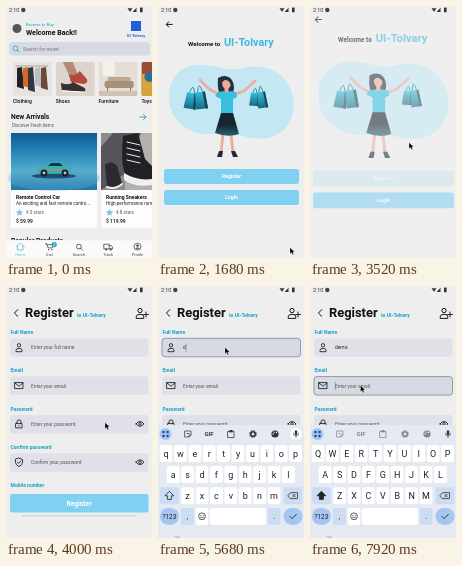
Recreate the animation shown at these times as an HTML page. Size 146 by 252 pixels, loop 8000 ms.

```html
<!DOCTYPE html>
<html lang="en">
<head>
<meta charset="utf-8">
<title>Shop app</title>
<style>
html, body { margin: 0; width: 100%; height: 100%; overflow: hidden; background: #eee; }
svg { display: block; width: 100%; height: 100%; }
text { font-family: Roboto, sans-serif; white-space: pre; }
</style>
</head>
<body>
<svg id="stage" viewBox="0 0 146 252"></svg>
<script>
const LOOP = 8000;
const BG = '#eeeeee', INK = '#111', CYAN = '#1b9fca', SKY = '#80d1f1', FIELD = '#dfe0e8';
const BRAND = 'UI-Tolvary';

// Markup helpers
const text = (x, y, size, str, fill = INK, weight = 400, anchor = 'start', extra = '') =>
  `<text x="${x}" y="${y}" font-size="${size}" fill="${fill}" font-weight="${weight}" text-anchor="${anchor}" ${extra}>${str}</text>`;
const rect = (x, y, w, h, fill, r = 0, extra = '') =>
  `<rect x="${x}" y="${y}" width="${w}" height="${h}" rx="${r}" fill="${fill}" ${extra}/>`;
const circle = (x, y, r, fill, extra = '') => `<circle cx="${x}" cy="${y}" r="${r}" fill="${fill}" ${extra}/>`;
const ellipse = (x, y, rx, ry, fill) => `<ellipse cx="${x}" cy="${y}" rx="${rx}" ry="${ry}" fill="${fill}"/>`;
const shape = (d, fill) => `<path d="${d}" fill="${fill}"/>`;
const line = (d, color = INK, w = .8) =>
  `<path d="${d}" fill="none" stroke="${color}" stroke-width="${w}" stroke-linecap="round" stroke-linejoin="round"/>`;
const group = (id, body, extra = '') => `<g id="${id}" ${extra}>${body}</g>`;
const at = (x, y, body) => `<g transform="translate(${x} ${y})">${body}</g>`;
const gradient = (id, stops, dir = 'x2="0" y2="1"') => `<linearGradient id="${id}" ${dir}>` +
  stops.map((c, i) => `<stop offset="${i / (stops.length - 1)}" stop-color="${c}"/>`).join('') + '</linearGradient>';

// Icons, centred on 0,0
const ring = (r, c = INK, w = .8) => circle(0, 0, r, 'none', `stroke="${c}" stroke-width="${w}"`);
const lens = c => ring(2.4, c) + line('M1.8 1.8L3.7 3.7', c);
const person = ring(1.7).replace('cy="0"', 'cy="-2"') + line('M-3 4V3Q-3 1 0 1T3 3V4Z');
const mail = line('M-4-3H4V3H-4ZM-4-2.6L0 .6L4-2.6');
const lock = line('M-3-.5H3V4H-3ZM-2-.5V-2Q-2-4 0-4T2-2V-.5M0 1.2V2');
const shield = line('M0-4L3.6-2.7V0Q3.2 3 0 4.4Q-3.2 3-3.6 0V-2.7ZM-1.5 0L-.3 1.2L1.7-1.2');
const eye = line('M-4 0Q0-5 4 0Q0 5-4 0Z') + circle(0, 0, 1.3, 'none', `stroke="${INK}" stroke-width=".8"`);
const star = shape('M0-3.6L1.1-1.2L3.6-1L1.7 .7L2.3 3.2L0 1.9L-2.3 3.2L-1.7 .7L-3.6-1L-1.1-1.2Z', '#72c7ea');
const arrow = (c, w) => line('M-3 0H3', c, w);

function statusBar() {
  return text(3, 6.2, 5.4, '2:10', '#333') + circle(17.3, 4, 2.2, '#444') +
    shape('M121.5 2.2H126.5L124 5.8Z', '#333') + shape('M130.5 6V1.8L126.6 6Z', '#333') +
    rect(134, 1.6, 2.6, 4.6, '#333', .5);
}

function categories() {
  const clothes = rect(0, 0, 39, 34, '#e6e3e0') + line('M3 4H35', '#8c8580', .7) +
    [['#1e2226', 4, 20], ['#d8672b', 10, 19], ['#33363a', 15, 23], ['#b9bec2', 22, 18], ['#6b4a3a', 28, 21]]
      .map(([c, x, h]) => shape(`M${x} 6L${x + 5} 5L${x + 7} ${h + 7}L${x} ${h + 5}Z`, c)).join('');
  const shoes = rect(0, 0, 39, 34, '#ddd5cb') + shape('M7 0L17 0L23 15L16 19Z', '#b58b76') +
    shape('M13 12Q19 15 24 9L31 17Q33 21 28 22L15 20Z', '#b4493f') +
    shape('M5 21Q14 24 17 20L29 26Q31 30 26 30L6 28Z', '#39302f') + line('M7 29L28 30', '#fff', 1.2);
  const sofa = rect(0, 0, 39, 34, '#e5ded5') + rect(4, 0, 12, 14, '#f4f1ec') +
    rect(9, 15, 23, 9, '#bda78f', 2) + rect(6, 19, 29, 7, '#a88f77', 2) +
    line('M9 26V30M32 26V30', '#6d5744') + rect(0, 29, 39, 5, '#d0c2b2');
  const toys = rect(0, 0, 39, 34, '#9a4b32') + rect(0, 12, 39, 22, '#d9a33c') + circle(8, 15, 5, '#2c6f96');
  return [clothes, shoes, sofa, toys].map((art, i) =>
    at(7 + 42.8 * i, 56, `<g clip-path="url(#thumb)">${art}</g>` +
      text(0, 41.4, 5, ['Clothing', 'Shoes', 'Furniture', 'Toys'][i], '#111', 500))).join('');
}

function car() {
  return ellipse(0, 8, 22, 2.5, '#1c4e70') +
    shape('M-17 4L-16-1L-8-2L-4-6H7L11-2L17-1L18 5L-15 6Z', '#35b1b5') +
    shape('M-6-2L-3-5H6L9-2Z', '#16354c') + line('M-14 2H15', '#e0823c', 1.2) +
    [-10, 11].map(x => circle(x, 5, 3.4, '#162028') + circle(x, 5, 1.4, '#b9c7cd')).join('');
}

function sneakers() {
  return rect(0, 0, 51, 57, '#b3b0ae') + rect(0, 0, 24, 57, '#8c8a8a') +
    shape('M0 14L12 0H40L25 40L0 57Z', '#55555a') +
    shape('M22 3L37 0L44 26L51 33V48Q38 51 26 44Q19 35 22 3Z', '#202126') +
    shape('M23 40Q36 48 51 46V52Q35 55 23 47Z', '#f1f0ee') +
    [9, 15, 21, 27].map(y => line(`M26 ${y}L39 ${y + 3}`, '#eee', 1)).join('') +
    shape('M4 32Q10 26 16 33L21 50Q13 57 6 53Z', '#2a2b30') + line('M6 54Q14 57 21 51', '#eee', 2);
}

function product(x, art, name, note, rating, price) {
  return at(x, 127, rect(0, 0, 86, 95, '#fdfdfd', 2) + art +
    text(5, 66, 5, name, INK, 700) + text(5, 72.4, 4.6, note, '#222') +
    at(8.5, 79.5, star) + text(15, 81.3, 4.6, rating, '#555') + text(5, 90.2, 5, price, INK, 500));
}

function tabBar() {
  const icons = [
    line('M-4 0L0-3.6L4 0M-2.8-.7V3.4H2.8V-.7', '#45b5de', .7),
    line('M-4.2-3H-3L-1.6 1.3H2.8L3.8-2H-2.5', '#333', .7) + circle(-1, 3, .7, '#333') + circle(2.4, 3, .7, '#333') +
      circle(4.6, -2, 2.6, '#249fbe') + text(4.6, -.7, 3.4, '2', '#fff', 700, 'middle'),
    lens('#333'),
    line('M-4-2.4H1V2.3H-4ZM1-1H3L4.3 .6V2.3H1', '#333', .7) + circle(-2, 2.9, .9, '#333') + circle(2.6, 2.9, .9, '#333'),
    ring(3.5, '#333', .7) + circle(0, -1, 1.2, '#333') + shape('M-2.2 2.2Q0-.4 2.2 2.2Z', '#333')
  ];
  return rect(0, 234, 146, 18, '#fafafa') + line('M0 234H146', '#dedede', .4) +
    ['Home', 'Cart', 'Search', 'Track', 'Profile'].map((name, i) =>
      at(14.3 + 29.3 * i, 240.6, icons[i] + text(0, 9, 4, name, i ? '#444' : '#62bfe2', 400, 'middle'))).join('');
}

function home() {
  return rect(0, 0, 146, 252, BG) + circle(11, 22.5, 4.5, '#555') +
    text(20, 20, 4.4, 'Browse to Buy', CYAN) + text(20, 29, 7.1, 'Welcome Back!!', INK, 700) +
    rect(125, 15, 10, 10, '#2360d8') + text(130, 30.7, 4, BRAND, '#2360d8', 700, 'middle') +
    rect(3, 36, 141, 13.5, '#d8dae3', 3.5) + at(9.5, 42.4, lens('#239fc9')) +
    text(17, 44.6, 4.9, 'Search for more!', '#777') + categories() +
    text(5, 113.2, 6.7, 'New Arrivals', INK, 700) + text(6, 120.5, 4.5, 'Discover Fresh Items', '#555') +
    at(137, 111, arrow('#229fcd', .9) + line('M.5-2.5L3 0L.5 2.5', '#229fcd', .9)) +
    product(5, rect(0, 0, 86, 57, 'url(#sea)') + ellipse(43, 45, 46, 13, '#56acd055') + at(43, 35, car()),
      'Remote Control Car', 'An exciting and fast remote contro...', '4.5 stars', '$ 59.99') +
    product(95, sneakers(), 'Running Sneakers', 'High-performance running', '4.8 stars', '$ 119.99') +
    text(5, 237, 6.7, 'Popular Products', INK, 700) + tabBar();
}

function bag(x, y, w, h, turn) {
  return `<g transform="translate(${x} ${y}) rotate(${turn})">` + line(`M${-w * .25} 0Q0-${h * .75} ${w * .25} 0`, '#24778c', .8) +
    shape(`M${-w / 2} 0H${w / 2}L${w / 2 + 1} ${h}H${-w / 2 - 1}Z`, 'url(#bag)') +
    shape(`M${w / 4} 0H${w / 2}L${w / 2 + 1} ${h}H${w / 4 + 1}Z`, '#164553') + '</g>';
}

function shopper() {
  const skin = '#efaaa0';
  return shape('M11 91C11 70 25 57 46 59C62 60 70 66 86 62C107 57 124 65 132 82C140 100 135 122 116 130C101 136 88 130 73 128C58 126 48 132 32 124C18 117 11 105 11 91Z', '#c3e8f3') +
    shape('M60 72Q59 89 64 88H74Q78 82 74 74Q68 67 60 72Z', '#23333e') +
    line('M62 89L51 83L42 74', skin, 2.6) + line('M75 89L86 85L97 75', skin, 2.6) +
    line('M65 128L63 147M73 128L75 147', skin, 2.8) +
    shape('M61 145H65L64 151H59ZM73 145H77L80 151H75Z', '#1d2a34') +
    rect(66.5, 81, 4, 6, skin) + ellipse(68.5, 77.5, 4.3, 5.4, skin) +
    shape('M63 77Q64 70 70 71Q75 73 73 79Q71 74 67 74Q65 75 63 77Z', '#23333e') +
    shape('M60 86L66 85Q68.5 88 71 85L78 86L79 91L75 93V108H63V93L57 90Z', '#38bfe0') +
    shape('M63 107H75L81 128Q70 132 57 127Z', 'url(#skirt)') +
    bag(34, 87, 10, 16, 9) + bag(42, 86, 10, 17, -7) + bag(97, 87, 8, 13, 4) + bag(103, 86, 8, 16, -8);
}

function welcome() {
  const button = (id, y, label) => group(id, rect(6, y, 135, 15, SKY, 2.5) +
    text(73.5, y + 9.4, 5.1, label, '#fff', 700, 'middle'));
  return rect(-20, -20, 186, 292, BG) + at(11.3, 18.4, arrow(INK, 1) + line('M-.5-2.6L-3 0L-.5 2.6', INK, 1)) +
    text(30, 40, 6.1, 'Welcome to', INK, 700) + text(66, 40, 10.8, BRAND, '#3bb9df', 700) +
    shopper() + button('press', 163, 'Register') + button('login', 184, 'Login');
}

function register() {
  const rows = [
    ['Full Name', 'Enter your full name', person], ['Email', 'Enter your email', mail],
    ['Password', 'Enter your password', lock], ['Confirm password', 'Confirm your password', shield]
  ];
  return line('M11.7 23.7L8.4 27L11.7 30.3', INK, 1) + text(19, 31.3, 12.9, 'Register', INK, 700) +
    text(71, 31, 5, 'to ' + BRAND, CYAN, 700) +
    at(134, 27, `<g transform="scale(1.25)">${person}</g>` + line('M6-1V4M3.5 1.5H8.5', INK, .9)) +
    rows.map(([label, hint, icon], i) => {
      const y = 52.3 + 38.3 * i;
      return text(4.5, y - 4.4, 5, label, CYAN, 700) +
        rect(4, y, 138.5, 18.5, FIELD, 3, `id="box${i}" stroke-width=".7"`) + at(13, y + 9, icon) +
        text(25, y + 11, 4.9, hint, '#555', 400, 'start', `id="hint${i}"`) + (i > 1 ? at(134, y + 9, eye) : '');
    }).join('') +
    text(4.5, 201, 5, 'Mobile number', CYAN, 700) +
    line('M16 229.8H130', '#b9bbc1', .7) + rect(4, 208, 138.5, 18.5, SKY, 2.5) +
    text(73, 219.8, 6.7, 'Register', '#fff', 700, 'middle');
}

function keyboard() {
  const pale = '#ccdcf3', blue = '#a6c5f2';
  const letters = (str, x0, y) => [...str].map((c, i) => at(x0 + 14.4 * i, y,
    rect(-6.4, -8.4, 12.8, 17, '#fff', 2.2) + text(0, 3, 9, c, '#222', 400, 'middle', 'class="key"'))).join('');
  const key = (x, y, w, fill, body, r = 2.4) => at(x, y, rect(-w / 2, -8.4, w, 17, fill, r) + body);
  const tools = at(30, 148, line('M-3-3H3V1L1 3H-3ZM3 1H1V3M-1-.5H1', '#444')) +
    text(51, 150.2, 6, 'GIF', '#333', 700, 'middle') +
    at(73, 148, line('M-3-2.6H3V3.6H-3Z', '#333') + rect(-1.5, -4, 3, 2.4, '#333')) +
    at(95, 148, ring(2.3, '#333', 1.6) + circle(0, 0, 3.4, 'none', 'stroke="#333" stroke-width="1" stroke-dasharray="1.4 1.27"')) +
    at(117, 148, circle(0, 0, 3.6, '#333') + [[-1.8, 0], [-.7, -1.9], [1.4, -1.5]].map(p => circle(...p, .7, '#fff')).join(''));
  return rect(0, 139, 146, 113, '#e5eaf2') + circle(7.5, 148, 6, blue) +
    [-2, 2].map(x => [-2, 2].map(y => circle(7.5 + x, 148 + y, 1.3, '#244f8f')).join('')).join('') +
    group('tools', tools) +
    circle(138, 148, 6, '#fff', 'id="micDisc"') +
    at(138, 148, rect(-1.2, -3.7, 2.4, 4.6, '#333', 1.2) + line('M-2.5-.5Q-2.5 2 0 2T2.5-.5M0 2V3.5', '#333', .7)) +
    letters('qwertyuiop', 8, 167.5) + letters('asdfghjkl', 15.2, 188.5) + letters('zxcvbnm', 29.6, 209.6) +
    key(11.4, 209.6, 19, pale, `<path id="shift" d="M0-4.4L4.4 .2H2V3.8H-2V.2H-4.4Z" stroke="#222" stroke-width=".8" stroke-linejoin="round"/>`) +
    key(135, 209.6, 19, pale, line('M-5 0L-2.4-3H4.5V3H-2.4ZM-.3-1.3L2.3 1.3M2.3-1.3L-.3 1.3', '#333')) +
    key(11.4, 230.3, 19, blue, text(0, 2.4, 6.4, '?123', '#222', 400, 'middle'), 8.4) +
    key(29.4, 230.3, 12.8, pale, text(0, 2.6, 8, ',', '#222', 400, 'middle')) +
    key(44, 230.3, 12.8, '#fff', ring(3.4, '#333') + circle(-1.2, -.8, .5, '#333') + circle(1.2, -.8, .5, '#333') + line('M-1.7 .9Q0 2.5 1.7 .9', '#333', .7)) +
    key(80, 230.3, 56, '#fff', '') + key(116, 230.3, 12.8, pale, text(0, 2.6, 8, '.', '#222', 400, 'middle')) +
    key(135, 230.3, 19, blue, line('M-3 .2L-.9 2.3L3.4-2', '#244', 1), 8.4) +
    line('M17.5 250.3L19.5 251.8L21.5 250.3', '#666', .6);
}

const stage = document.getElementById('stage');
stage.innerHTML = '<defs>' +
  gradient('sea', ['#0d5b92', '#2586b9', '#55acce', '#2275a6']) +
  gradient('bag', ['#35bddb', '#176a82']) + gradient('skirt', ['#18242e', '#18242e', '#256172']) +
  `<clipPath id="thumb">${rect(0, 0, 39, 34, '#000', 2)}</clipPath></defs>` +
  group('home', home()) + group('welcome', welcome()) + rect(0, 0, 146, 252, BG, 0, 'id="veil"') +
  group('register', register()) + group('caret', line('M25.3 58V65.5', '#2494bd', .6)) +
  group('keyboard', keyboard()) + statusBar() +
  group('cursor', shape('M0 0V6.3L1.5 5L2.5 7.2L3.7 6.7L2.7 4.5H4.6Z', '#000'), 'stroke="#fff" stroke-width=".3"');

const $ = id => document.getElementById(id);
const el = Object.fromEntries([...stage.querySelectorAll('[id]')].map(n => [n.id, n]));
const keys = [...stage.querySelectorAll('.key')].map(node => [node, node.textContent]);
const set = (node, attrs) => { for (const k in attrs) node.setAttribute(k, attrs[k]); };
const show = (node, on) => set(node, { visibility: on ? 'visible' : 'hidden' });

const clamp = v => Math.max(0, Math.min(1, v));
const span = (t, a, b) => clamp((t - a) / (b - a));
const smooth = v => v * v * (3 - 2 * v);
const zoom = s => `translate(73 126) scale(${s}) translate(-73 -126)`;

// Pointer stops: time, x, y
const stops = [
  [600, 145, 252], [900, 132, 241.5], [1760, 132, 241.5], [2400, 92, 171], [3300, 84, 170],
  [3520, 99, 136.5], [4160, 99, 136.5], [4880, 67, 61.5], [6800, 67, 61.5], [7120, 50.5, 99.5], [LOOP, 50.5, 99.5]
];
function pointer(t) {
  const i = Math.max(1, stops.findIndex(s => s[0] >= t));
  const [a, b] = [stops[i - 1], stops[i]];
  const p = smooth(span(t, a[0], b[0]));
  return [a[1] + (b[1] - a[1]) * p, a[2] + (b[2] - a[2]) * p];
}

function draw(t) {
  const onEmail = t >= 7200, focus = t >= 5080 ? (onEmail ? 1 : 0) : -1;
  show(el.home, t < 1600);
  show(el.welcome, t >= 1600 && t < 3900);
  set(el.welcome, { transform: zoom(1 + .1 * smooth(span(t, 3400, 3660))) });
  set(el.press, { opacity: 1 - .7 * span(t, 3240, 3360) });
  set(el.veil, { opacity: span(t, 3400, 3680) });
  const enter = smooth(span(t, 3540, 3760));
  set(el.register, { opacity: enter, transform: zoom(.92 + .08 * enter) });

  for (let i = 0; i < 4; i++) set(el['box' + i], {
    stroke: i === focus ? '#6f7c88' : 'none', fill: i === focus && t > 5200 ? '#d7dae3' : FIELD
  });
  const typed = 'demo'.slice(0, Math.max(0, Math.floor((t - 5600) / 280) + 1));
  el.hint0.textContent = typed || 'Enter your full name';
  set(el.hint0, { fill: typed ? '#222' : '#555' });
  show(el.caret, focus >= 0 && (t - (onEmail ? 7200 : 5080)) % 1000 < 800);
  const advance = typed && !onEmail ? el.hint0.getComputedTextLength() : 0;
  set(el.caret, { transform: `translate(${advance} ${onEmail ? 38.3 : 0})` });

  const upper = !typed || onEmail;
  show(el.keyboard, t >= 5200);
  set(el.keyboard, { transform: `translate(0 ${113 * (1 - smooth(span(t, 5200, 5460)))})` });
  for (const [node, c] of keys) node.textContent = upper ? c.toUpperCase() : c;
  set(el.shift, { fill: upper ? '#222' : 'none' });
  set(el.tools, { opacity: onEmail ? .55 : 1 });
  show(el.micDisc, t >= 5200 && !onEmail);

  const [x, y] = pointer(t);
  show(el.cursor, t >= 600);
  set(el.cursor, { transform: `translate(${x} ${y})` });
}

const start = performance.now();
function tick() {
  draw((performance.now() - start) % LOOP);
  requestAnimationFrame(tick);
}
tick();
</script>
</body>
</html>
```
